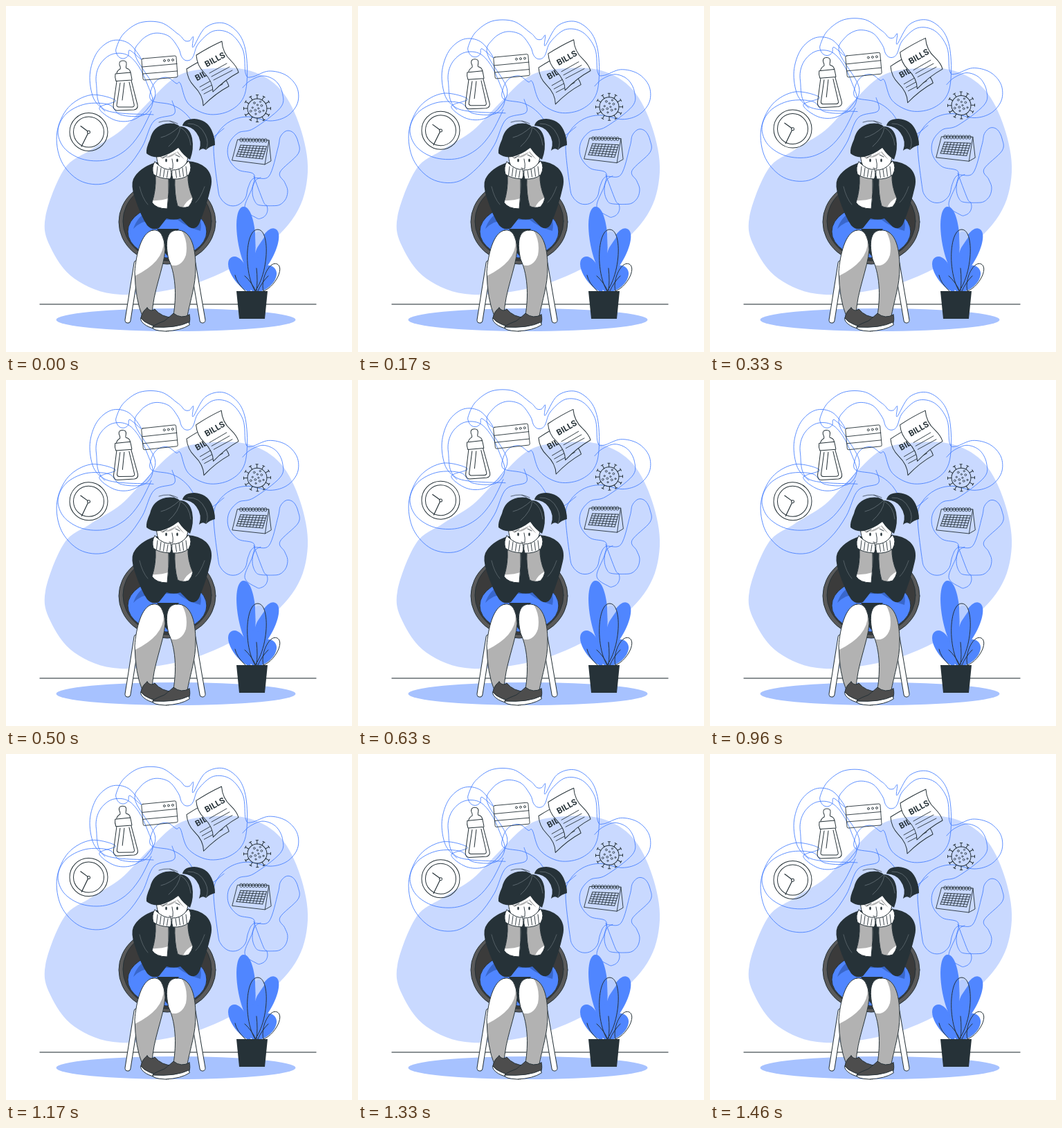
An HTML page with a canvas that plays this animation: 500 px wide and 500 px high, repeating every 1500 ms.

```html
<!DOCTYPE html>
<html lang="en">
<head>
<meta charset="utf-8">
<title>Worries</title>
<style>
html,body{margin:0;width:100%;height:100%;overflow:hidden;background:#fff}
canvas{display:block;width:100vw;height:100vh}
</style>
</head>
<body>
<canvas id="stage"></canvas>
<script>
const canvas = document.getElementById('stage');
const ctx = canvas.getContext('2d');
const DARK = '#263238', BLUE = '#5086ff', LINE = '#407bff', GRAY = '#b2b2b2', SOFT = '#4d4d4d';
const LOOP = 1500, STEPS = 36;

const svg = text => new Path2D(text);
const times = (n, draw) => { for (let i = 0; i < n; i++) draw(i); };

// Smooth curve through a list of [x, y]
function curve(points, closed) {
  const n = points.length, path = new Path2D();
  const at = i => points[closed ? (i + n) % n : Math.max(0, Math.min(n - 1, i))];
  path.moveTo(...points[0]);
  times(closed ? n : n - 1, i => {
    const [a, b, c, d] = [at(i - 1), at(i), at(i + 1), at(i + 2)];
    path.bezierCurveTo(b[0] + (c[0] - a[0]) / 6, b[1] + (c[1] - a[1]) / 6,
      c[0] - (d[0] - b[0]) / 6, c[1] - (d[1] - b[1]) / 6, ...c);
  });
  return path;
}

function circle(x, y, rx, ry = rx) {
  const path = new Path2D();
  path.ellipse(x, y, rx, ry, 0, 0, 7);
  return path;
}

// Points along an elliptic arc, angles in degrees; without radii a single point
function lobe([x, y, rx, ry, from, to]) {
  if (!rx) return [[x, y]];
  const n = Math.ceil(Math.abs(to - from) / 40);
  return Array.from({length: n + 1}, (_, i) => {
    const a = (from + (to - from) * i / n) * Math.PI / 180;
    return [x + rx * Math.cos(a), y + ry * Math.sin(a)];
  });
}
const strand = (...lobes) => curve(lobes.flatMap(lobe));

function paint(path, fill, stroke, width = 1) {
  if (fill) { ctx.fillStyle = fill; ctx.fill(path); }
  if (stroke) { ctx.strokeStyle = stroke; ctx.lineWidth = width; ctx.stroke(path); }
}
const ink = (path, width = 1) => paint(path, null, DARK, width);

function local(x, y, angle, draw) {
  ctx.save(); ctx.translate(x, y); ctx.rotate(angle); draw(); ctx.restore();
}

function shaded(path, base, shade, color) {
  paint(path, base);
  ctx.save(); ctx.clip(path); paint(shade, color); ctx.restore();
  ink(path);
}

const blob = curve([[57, 305], [84, 236], [122, 208], [166, 180], [203, 142], [248, 101], [300, 90], [354, 94],
  [397, 121], [425, 175], [436, 240], [418, 302], [362, 357], [270, 402], [165, 417], [99, 394], [64, 348]], true);

const strands = [
  strand([240, 137], [243, 156], [214, 166], [197, 203], [130, 193, 57, 65, 40, 300],
    [170, 112, 46, 55, 140, 10], [219, 72, 32, 33, 180, 340], [262, 66, 10, 13, 150, 30],
    [308, 89, 39, 54, 220, 370], [382, 130, 41, 36, 230, 450], [350, 205, 50, 45, 270, 180],
    [328, 262, 22, 27, 180, 0], [358, 249], [380, 246], [408, 205, 15, 25, 180, 380],
    [396, 240], [388, 268, 19, 21, 320, 460], [368, 268, 12, 20, 100, 270]),
  strand([210, 152], [193, 185], [130, 182, 55, 42, 40, 290], [165, 157], [198, 158], [212, 140], [205, 115],
    [163, 106, 33, 38, 330, 170], [143, 150], [213, 157]),
  strand([143, 152], [161, 105, 40, 56, 150, 330], [169, 64, 10, 12, 0, 200],
    [209, 58, 45, 36, 210, 330], [262, 38, 10, 13, 150, 30], [308, 78, 40, 54, 200, 360],
    [300, 112, 48, 45, 20, 180], [230, 128, 21, 25, 320, 160], [240, 143], [262, 158], [288, 192], [315, 177]),
  strand([342, 118], [371, 132, 29, 31, 230, 390], [358, 210, 38, 33, 270, 90],
    [356, 262], [345, 292], [366, 294, 12, 13, 110, -60], [358, 246])
];

function drawClock() {
  [27.5, 22].forEach(r => ink(circle(119.5, 182, r)));
  ink(svg('M108 173.5L118 181M118.5 184L109 203'), 1.2);
  paint(circle(119.5, 182.3, 2), '#fff', DARK);
}

function drawBottle() {
  ink(svg('M160 97Q161 93 165 91Q166 89 164 85Q163 79 169 79Q175 79 174 85Q173 89 174 90Q179 91 180 96'));
  ink(svg('M158 98L180 96Q182 105 182 107L159 108.5Q157 103 158 98Z'));
  ink(svg('M160 109L155 144Q155 150 160 151L185 150Q191 149 190 143L181 107.5'));
  ink(svg('M165 111L160 143Q160 146 163 146L182 146Q186 146 185 142L178 110M171 111L168 136'));
}

function drawCard() {
  ink(svg('M198 76L244 72Q246 72 246 74L248 101Q248 103 246 103L200 107Q198 107 198 105L196 78Q196 76 198 76ZM197 88L247 83.5M197.5 98L247.5 94'), .9);
  times(3, i => ink(circle(229 + 6 * i, 79 - .5 * i, 1.5), .9));
}

const page = svg('M275 71Q294 59 312 51Q313 68 325 79Q334 88 336 96Q317 106 299 124Q299 109 286 96Q276 86 275 71Z');

function drawPage() {
  ink(page);
  local(290, 88.5, -.5, () => {
    ctx.font = 'bold 12px Roboto, sans-serif';
    ctx.fillStyle = DARK;
    ctx.fillText('BILLS', 0, 0);
  });
  times(3, i => ink(svg(`M${294 + 3 * i} ${97 + 5 * i}L${319 + 4 * i} ${83 + 5 * i}`), .9));
}

function drawBills() {
  const behind = new Path2D(page);
  behind.rect(240, 30, 120, 130);
  ctx.save();
  ctx.clip(behind, 'evenodd');
  local(-14, 20, 0, drawPage);
  ctx.restore();
  drawPage();
}

function drawVirus() {
  local(363, 148, 0, () => {
    ink(circle(0, 0, 14));
    times(12, i => local(0, 0, i * Math.PI / 6, () => ink(svg('M0-14V-19M-1.7-19.5H1.7'))));
    times(11, i => {
      const angle = i * 2.4, r = 3.3 * Math.sqrt(i + .3);
      ink(circle(r * Math.cos(angle), r * Math.sin(angle), 1.1 + i % 2 * .3), .8);
    });
  });
}

function drawCalendar() {
  ink(svg('M335 193L380 194L374 229L327 223ZM380 194L383 224L374 229'), .9);
  times(9, i => {
    ink(svg(`M${339 + i * 4.7} ${201 + i * .25}l-6 ${16 + i * .25}`), .9);
    ink(circle(340 + i * 4.4, 193.5 + i * .1, 2.1, 2.7), .8);
  });
  times(6, i => ink(svg(`M${339 - i * 1.2} ${201 + i * 3.2}l37.6 ${2 + i * .4}`), .9));
}

const icons = [
  [drawClock, 119.5, 182], [drawBottle, 172, 118], [drawCard, 222, 90],
  [drawBills, 299, 94], [drawVirus, 363, 148], [drawCalendar, 355, 208]
];

function drawThoughts(lift) {
  local(0, .28 - 10 * lift, 0, () => {
    strands.forEach(path => paint(path, null, LINE, .85));
    for (const [draw, x, y] of icons) {
      local(x, y, -.028 * lift, () => { ctx.translate(-x, -y); draw(); });
    }
  });
}

function drawChair() {
  for (const leg of [svg('M189 372L176 454'), svg('M270 372L284 454')]) {
    paint(leg, null, DARK, 9);
    paint(leg, null, '#fff', 7);
  }
  paint(circle(233, 312, 70, 61), '#5a5a5a', DARK);
  paint(circle(233, 311, 64, 57), '#3b3b3b', DARK);
  shaded(circle(233, 326, 57, 38), BLUE, svg('M184 322Q190 304 204 298L270 294Q285 306 281 325Q262 320 248 309H215Q195 310 184 322Z'), '#3967cb');
}

function drawLegs() {
  paint(svg('M218 322H250L237 340L234 362Q226 355 229 342Z'), DARK);
  shaded(svg('M212 324C195 327 188 360 186 384Q187 425 197 448H211C212 412 228 380 230 352Q228 321 212 324Z'),
    '#fff', svg('M180 393Q228 372 228 340L220 320H240V460H180Z'), GRAY);
  shaded(svg('M247 324C231 324 230 344 235 366C247 392 246 425 241 453H261C267 421 274 405 274 378C274 345 266 323 247 324Z'),
    '#fff', svg('M228 371Q252 383 260 360Q264 338 251 320H285V470H228Z'), GRAY);
  paint(svg('M204 436Q196 442 195 451Q196 458 207 461L235 470L241 450Q225 450 215 438Q209 443 204 436Z'), SOFT, DARK);
  paint(svg('M195 451Q202 462 235 467L233 470Q200 466 195 454Z'), '#fff', DARK);
  paint(svg('M265 446Q267 454 264 460Q251 468 228 469Q211 469 212 463Q218 459 229 455Q239 447 242 444Q253 453 265 446Z'), SOFT, DARK);
  paint(svg('M264 457Q246 466 212 464Q211 469 230 470Q253 469 265 461Z'), '#fff', DARK);
}

function drawBody() {
  paint(svg('M216 226Q192 234 184 250Q180 259 186 277Q195 304 204 317Q211 325 221 321L232 307Q243 310 252 307L264 319Q273 325 279 315Q290 289 296 262Q300 245 289 234Q279 225 262 224Z'), DARK);
  paint(svg('M193 261Q197 278 205 287M287 261Q281 278 274 284'), null, '#667178', .7);
  shaded(svg('M216 246Q217 266 211 284Q217 293 233 293Q236 270 235 246Z'), '#fff', svg('M205 240H240V276Q226 282 210 281Z'), GRAY);
  shaded(svg('M244 247Q243 272 248 289Q255 293 264 290Q269 284 270 278Q262 260 263 243Z'), '#fff', svg('M240 240H280V274Q262 276 255 293L240 288Z'), GRAY);
}

function drawHead() {
  paint(svg('M217 205Q216 229 226 238Q239 247 252 238Q264 230 265 205Z'), '#fff', DARK);
  paint(svg('M219 215Q236 225 248 210L258 222Q250 216 247 211Q234 217 226 221Z'), GRAY);
  [231.5, 247.5].forEach(x => paint(circle(x, 223, 1.3, 2.6), DARK));
  ink(svg('M240 221Q242 229 241 235Q239 236 236 234M227 219L233 216M245 215L251 218'), .9);
  paint(svg('M215 225Q210 233 213 243Q220 249 237 250Q240 246 238 236Q229 238 217 227Z'), '#fff', DARK);
  paint(svg('M264 224Q270 233 264 244Q255 251 241 250Q239 245 240 237Q252 238 261 227Z'), '#fff', DARK);
  times(4, i => ink(svg(`M${219 + 5 * i} ${232 + 2 * i}l-1.5 ${13 - i}M${245 + 5 * i} ${238 - 2 * i}l1.5 ${10 + i}`), .9));
  ink(svg('M221 168Q235 163 248 170M237 166Q242 168 246 172'), .7);
  paint(svg('M255 173Q257 163 272 163Q290 164 297 179Q302 190 302 201Q294 203 289 208Q284 204 279 209Q284 195 275 183Q269 174 255 173Z'), DARK);
  paint(svg('M203 213Q202 206 208 193Q212 174 231 170Q245 168 251 174Q265 174 269 191Q272 207 266 222Q257 217 249 205Q236 215 223 218Q211 220 203 213Z'), DARK);
  paint(svg('M251 174Q237 187 224 190M252 175Q250 190 235 203M253 176Q265 183 267 201M263 170Q280 169 288 186Q294 198 289 207'), null, '#77838a', .65);
}

// Leaf from its base (x, y) to its tip
function leaf(x, y, tipX, tipY, width) {
  const dx = tipX - x, dy = tipY - y, k = 1.35 * width / Math.hypot(dx, dy);
  const side = s => [
    x + dx * .3 - s * dy * k, y + dy * .3 + s * dx * k,
    x + dx - s * dy * k, y + dy + s * dx * k
  ];
  const path = new Path2D();
  path.moveTo(x, y);
  path.bezierCurveTo(...side(1), tipX, tipY);
  const [ax, ay, bx, by] = side(-1);
  path.bezierCurveTo(bx, by, ax, ay, x, y);
  return path;
}

function drawPlant() {
  const leaves = [leaf(353, 390, 343, 290, 13), leaf(356, 398, 389, 322, 13), leaf(353, 414, 326, 363, 12),
    leaf(360, 414, 386, 377, 13), leaf(358, 414, 358, 362, 15)];
  leaves.forEach(path => paint(path, BLUE));
  paint(svg('M360 330Q366 320 374 333L361 352Z'), '#b7cdff');
  [leaf(360, 412, 364, 323, 13.5), leaf(372, 412, 392, 373, 9)].forEach(path => ink(path));
  ink(svg('M346 412Q333 400 331 389M362 379Q364 397 362 412M345 390Q355 399 361 412M379 390Q369 400 364 412'));
  paint(svg('M333 412H378L374 452H337Z'), DARK);
}

function drawScene(lift) {
  const scale = canvas.width / 500;
  ctx.setTransform(scale, 0, 0, scale, 0, 0);
  ctx.lineCap = ctx.lineJoin = 'round';
  ctx.fillStyle = '#fff';
  ctx.fillRect(0, 0, 500, 500);
  paint(blob, '#c9d9ff');
  paint(svg('M49 431H448'), null, '#666e72', 1.4);
  paint(circle(245.5, 453.5, 173, 16.5), '#a7c2ff');
  drawThoughts(lift);
  drawChair();
  drawLegs();
  drawBody();
  drawHead();
  drawPlant();
}

// Linear rise and fall in 24 steps per second
function frame() {
  const step = Math.floor((performance.now() - start + 5) * STEPS / LOOP) % STEPS;
  const phase = (step + .5) / STEPS;
  drawScene(1 - Math.abs(2 * phase - 1));
  requestAnimationFrame(frame);
}
canvas.width = canvas.height = 500 * (window.devicePixelRatio || 1);
const start = performance.now();
frame();
</script>
</body>
</html>
```
